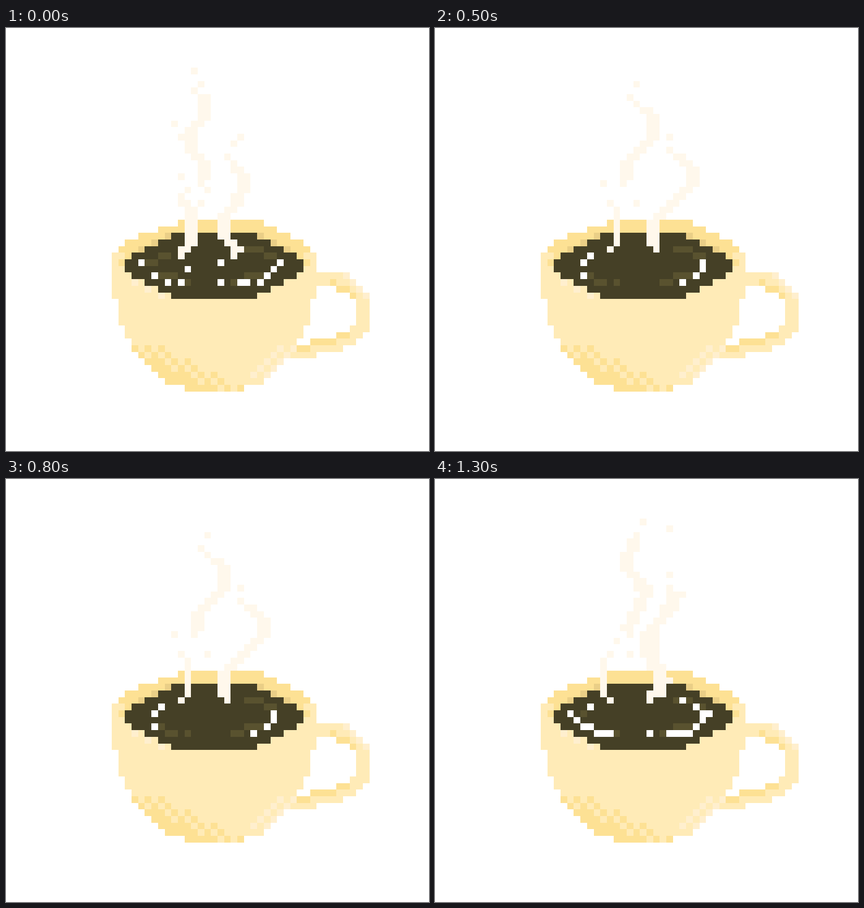
Recreate the animation shown at these times as an HTML page with a canvas. Size 748 by 748 pixels, loop 1.5 s.

```html
<!DOCTYPE html>
<html lang="en">
<head>
<meta charset="utf-8">
<title>Coffee cup</title>
<style>
html, body { margin: 0; width: 100%; height: 100%; overflow: hidden; background: #fff; }
canvas { display: block; width: 100vw; height: 100vh; image-rendering: pixelated; }
</style>
</head>
<body>
<canvas width="64" height="64"></canvas>
<script>
const ctx = document.querySelector('canvas').getContext('2d');
const BASE = '#ffebb7', RIM = '#fde194', SHADE = '#eacf87', PALE = '#ffefce';
const COFFEE = '#454026', OLIVE = '#59522f', STEAM = '#fff8ec', SHINE = '#fff';
const AXIS = 31.5, STEP = 500;

const ink = color => { ctx.fillStyle = color; };
const box = (x, y, w = 1, h = 1) => ctx.fillRect(x, y, w, h);

// Row centred on the cup axis; extra lengthens its right end
const span = (y, half, extra = 0) => box(AXIS - half, y, 2 * half + extra, 1);

// Polyline stamped with a square brush
function trace(points, size = 1) {
  points.forEach(([x, y], i) => {
    const [px, py] = points[Math.max(0, i - 1)];
    const n = Math.max(Math.abs(x - px), Math.abs(y - py)) || 1;
    for (let j = 0; j <= n; j++) {
      box(Math.round(px + (x - px) * j / n), Math.round(py + (y - py) * j / n), size, size);
    }
  });
}

// Half widths of the parts of the cup at row y
const rim = y => 15.5 - Math.ceil(0.4 * (34 - y) ** 2);
const bowl = y => y === 54 ? 4.5 : 15.5 - Math.ceil(0.045 * Math.max(0, y - 40) ** 2);
const pool = y => Math.min(13.5, 14.5 - 2 * Math.floor(Math.abs(y - 35.5)));

function handle() {
  ink(BASE);
  trace([[46, 37], [50, 37], [53, 40], [53, 44], [51, 46], [43, 48]], 2);
  ink(RIM);
  trace([[49, 38], [52, 40]]);
  trace([[51, 46], [44, 48]]);
  ink(PALE);
  trace([[51, 37], [54, 40]]);
}

// Checkered shadow at the lower left, faint light at the lower right
function speckle() {
  for (let y = 48; y <= 54; y++) {
    const half = bowl(y), left = AXIS - half;
    for (let d = 0; d < 2 * half; d++) {
      const odd = (left + d + y) % 2, fromRight = 2 * half - 1 - d;
      if (d < (y - 48) * 0.8 || odd && d < y - 43) {
        ink(RIM);
        box(left + d, y);
      } else if (odd && fromRight < 4 && y < 53) {
        ink(PALE);
        box(left + d, y);
      }
    }
  }
}

function cup() {
  handle();
  ink(BASE);
  for (let y = 34; y <= 54; y++) span(y, bowl(y));
  speckle();

  ink(RIM);
  for (let y = 29; y < 34; y++) span(y, rim(y), Math.max(0, 31 - y));
  span(34, 13.5);
  span(35, 14.5);
  ink(SHADE);
  for (let y = 31; y < 34; y++) span(y, pool(y) + 1);
  ink(PALE);
  for (let y = 38; y <= 40; y++) box(AXIS - pool(y) - 2, y);
  ink(COFFEE);
  for (let y = 31; y <= 40; y++) span(y, pool(y));
}

// Swaying ribbon of steam that furthest leaves x at row crest
function wisp({ top, end, x, sway, crest, period, width = 2, lean = 0 }) {
  for (let y = top; y <= end; y++) {
    const at = x + lean * (y - crest) + sway * Math.cos((y - crest) / period * 2 * Math.PI);
    const left = Math.round(at);
    const w = y === top || y === end ? 1 : Math.round(at + width) - left;
    box(left, y, w);
  }
}

const reflection = [[[36, 33], [38, 33], [40, 34]], [[38, 37], [36, 37], [34, 38]], [[27, 38]]];

const poses = [
  {
    glow: [[[24, 34], [21, 35]], [[23, 37], [25, 37]]],
    shine: [[[41, 35], [38, 38]], [[35, 38], [36, 38]], [[20, 35]], [[22, 37]],
            [[24, 38]], [[26, 38]], [[27, 36]], [[32, 35]], [[32, 38]]],
    motes: [[28, 6], [29, 8], [25, 14], [26, 16], [26, 22], [27, 24], [30, 24], [29, 26], [35, 16], [34, 17], [33, 19]],
    wisps: [
      { top: 9, end: 23, x: 28, sway: 1, crest: 11.5, period: 10 },
      { top: 25, end: 34, x: 26.2, sway: 0.8, crest: 29.5, period: 14 },
      { top: 20, end: 34, x: 33.5, sway: 1.6, crest: 23, period: 13 }
    ]
  },
  {
    glow: [[[23, 37], [25, 38]]],
    shine: [[[23, 34], [22, 35]], [[22, 37]], [[40, 35], [40, 36], [39, 37]], [[37, 38]]],
    motes: [[30, 8], [29, 10], [35, 16], [25, 23], [30, 26]],
    wisps: [
      { top: 11, end: 23, x: 30, sway: 2, crest: 14.5, period: 14 },
      { top: 26, end: 33, x: 26.3, sway: 0.9, crest: 29.5, period: 12, width: 1 },
      { top: 18, end: 33, x: 35, sway: 3, crest: 22, period: 17 }
    ]
  },
  {
    glow: [[[22, 35]]],
    shine: [[[20, 35], [22, 37], [26, 38]], [[41, 35], [38, 38], [35, 38]],
            [[40, 35]], [[23, 34]], [[39, 34]], [[37, 33]], [[32, 38]]],
    motes: [[31, 6], [35, 7], [35, 14], [32, 16], [32, 17], [27, 24], [29, 26]],
    wisps: [
      { top: 8, end: 23, x: 29, sway: -1.2, crest: 12, period: 10, lean: 0.06 },
      { top: 26, end: 33, x: 25.6, sway: -0.8, crest: 29.5, period: 12, width: 1 },
      { top: 16, end: 33, x: 33.5, sway: 1.5, crest: 17.5, period: 13, width: 2.5, lean: -0.15 }
    ]
  }
];

function draw({ glow, shine, motes, wisps }) {
  ctx.clearRect(0, 0, 64, 64);
  cup();
  ink(OLIVE);
  [...reflection, ...glow].forEach(line => trace(line));
  ink(SHINE);
  shine.forEach(line => trace(line));
  ink(STEAM);
  motes.forEach(([x, y]) => box(x, y));
  wisps.forEach(wisp);
}

const start = performance.now();
function tick() {
  const t = Math.max(0, performance.now() - start);
  draw(poses[Math.floor(t / STEP) % poses.length]);
  requestAnimationFrame(tick);
}
tick();
</script>
</body>
</html>
```
